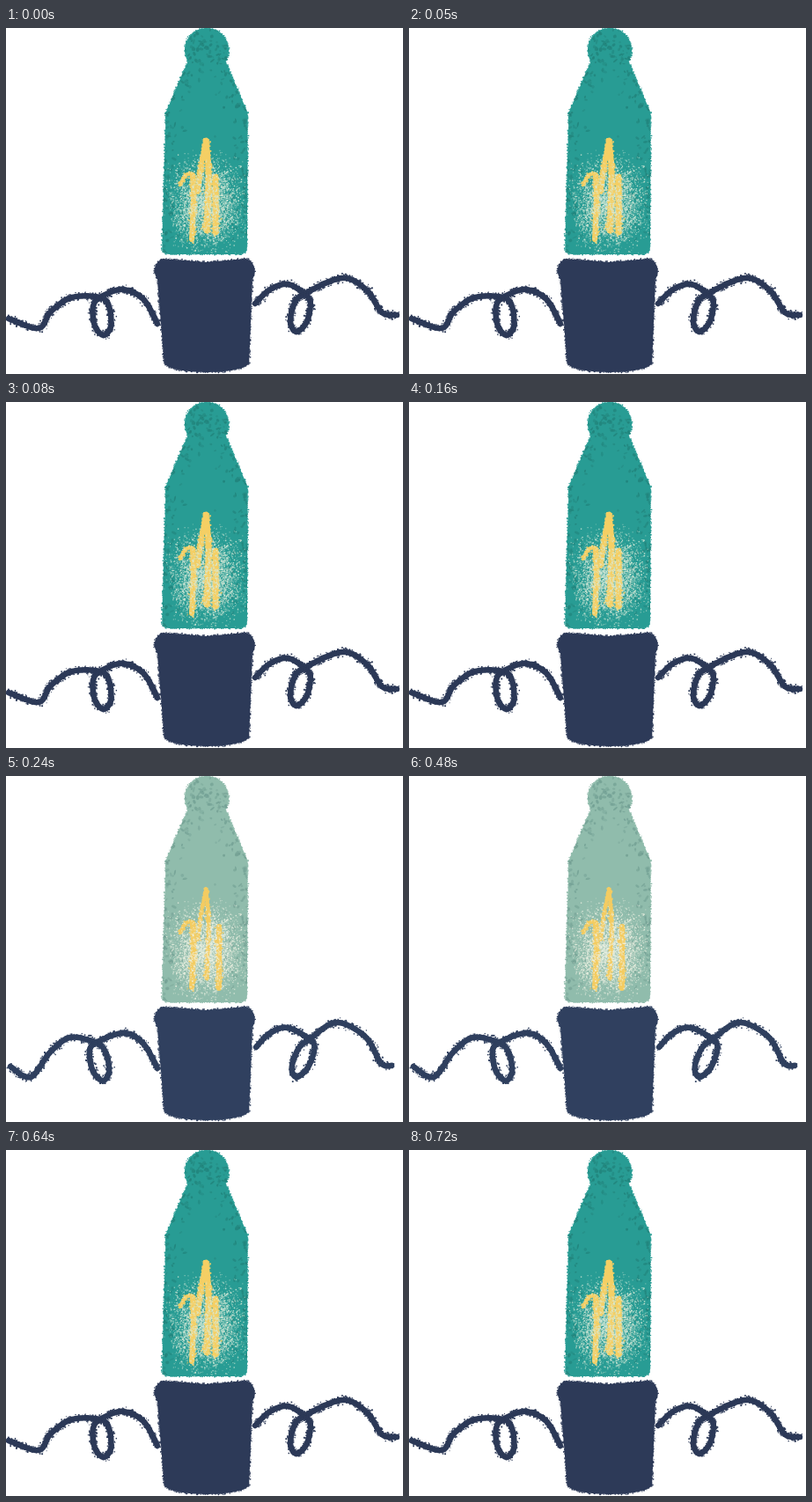
These frames come from a looping animation (451x393 px, 0.8 s). An HTML page with a canvas:

```html
<!DOCTYPE html>
<html lang="en">
<head>
<meta charset="utf-8">
<title>Blinking bulb</title>
<style>
html, body { margin: 0; width: 100%; height: 100%; overflow: hidden; background: #fff; }
canvas { display: block; }
</style>
</head>
<body>
<canvas id="stage" width="451" height="393"></canvas>
<script>
const W = 451, H = 393, LOOP = 800, ON = 240, OFF = 640;
const stage = document.getElementById('stage').getContext('2d');
const { PI, sin, sqrt, min, max, abs, hypot } = Math;

const DIM = {
  glass: '#289c94', grain: '#1e8078', navy: '#2d3a58', spray: '#d9ecd9', gold: '#f5cf63',
  peakWidth: 9, bar: { x: 238, top: 169, end: 232, width: 9 },
  wires: [
    { inner: [[172, 336], [156, 308], [132, 297]], knot: [107, 306], lean: 4, side: -1,
      outer: [[75, 306], [51, 322], [37, 341], [3, 330]] },
    { inner: [[283, 313], [300, 297], [320, 291]], knot: [339, 302], lean: -9, side: 1,
      outer: [[382, 284], [410, 298], [427, 323], [444, 326]] }
  ]
};
const LIT = {
  glass: '#90bcac', grain: '#6f9d91', navy: '#30405f', spray: '#eff3e4', gold: '#f4cc60',
  peakWidth: 5.5, bar: { x: 242, top: 171, end: 241, width: 8 },
  wires: [
    { inner: [[172, 332], [156, 304], [134, 292]], knot: [102, 303], lean: 8, side: -1,
      outer: [[73, 297], [50, 314], [28, 342], [5, 330]] },
    { inner: [[284, 308], [300, 292], [320, 286]], knot: [345, 299], lean: -15, side: 1,
      outer: [[375, 280], [408, 296], [426, 326], [438, 329]] }
  ]
};

let seed = 1;
function rnd() {
  seed = (seed + 0x6D2B79F5) | 0;
  let v = Math.imul(seed ^ (seed >>> 15), 1 | seed);
  v = (v + Math.imul(v ^ (v >>> 7), 61 | v)) ^ v;
  return ((v ^ (v >>> 14)) >>> 0) / 4294967296;
}
const bell = () => rnd() + rnd() + rnd() - 1.5;
const arc = (d, r) => sqrt(max(0, r * r - d * d));

// Half widths of the two bodies at a given height
function glassHalf(y) {
  const knob = y < 38 ? arc(y - 25, 25) : 0;
  const shoulder = y < 34 ? 0 : min(46.5, 21.5 + (y - 38) * 0.43) + max(0, y - 100) * 0.012;
  const corner = y > 249 ? 8 - arc(y - 249, 8) : 0;
  return max(knob, shoulder) - corner;
}
function socketHalf(y) {
  const rim = y < 291 ? 42 + arc(y - 276, 15) : 0;
  const side = y < 276 ? 0 : 54.5 - (y - 276) * 0.06;
  const base = y > 380 ? sqrt(max(0, 1 - ((y - 380) / 11) ** 2)) : 1;
  return max(rim, side) * base;
}
const glassMid = y => 228 - max(0, y - 100) * 0.016;
const socketMid = y => 225.5 + (y - 262) * 0.02;

function outline(top, end, half, mid) {
  const right = [], left = [];
  for (let y = top; y <= end; y += 0.5) {
    right.push([mid(y) + half(y), y]);
    left.unshift([mid(y) - half(y), y]);
  }
  return right.concat(left);
}

// Catmull-Rom samples through the points
function curve(pts, steps = 16) {
  const out = [], at = i => pts[max(0, min(pts.length - 1, i))];
  for (let i = 0; i < pts.length - 1; i++) {
    const [a, b, c, d] = [at(i - 1), at(i), at(i + 1), at(i + 2)];
    for (let k = 0; k < steps; k++) {
      const t = k / steps;
      out.push([0, 1].map(j => b[j] + 0.5 * t * (c[j] - a[j] +
        t * (2 * a[j] - 5 * b[j] + 4 * c[j] - d[j] +
        t * (3 * b[j] - a[j] - 3 * c[j] + d[j])))));
    }
  }
  return out.concat([at(pts.length)]);
}

// A wire runs from the socket, curls once below its knot and goes on
function wirePath({ inner, knot, lean, side, outer }) {
  const curl = [];
  for (let i = 0; i <= 6; i++) {
    const u = i / 6, drop = sin(PI * u) ** 2;
    curl.push([knot[0] + lean * drop + side * 10.5 * sin(2 * PI * u), knot[1] + 43 * drop]);
  }
  return curve([...inner, ...curl, ...outer]);
}

function trace(g, pts) {
  g.beginPath();
  pts.forEach(p => g.lineTo(p[0], p[1]));
}

// Loose specks around a line
function crumbs(g, pts, spread, perPixel, size) {
  for (let i = 1; i < pts.length; i++) {
    const [x, y] = pts[i], [px, py] = pts[i - 1];
    const count = Math.floor(hypot(x - px, y - py) * perPixel + rnd());
    for (let k = 0; k < count; k++) {
      const t = rnd(), s = size * (0.6 + rnd() * 0.8);
      g.fillRect(px + (x - px) * t + bell() * spread - s / 2,
                 py + (y - py) * t + bell() * spread - s / 2, s, s);
    }
  }
}

function solid(g, pts, color) {
  g.fillStyle = color;
  trace(g, pts);
  g.fill();
  crumbs(g, pts, 1, 0.8, 1.2);
}

function chalk(g, pts, width, color) {
  g.fillStyle = g.strokeStyle = color;
  g.lineWidth = width * 0.75;
  g.lineCap = g.lineJoin = 'round';
  trace(g, pts);
  g.stroke();
  crumbs(g, pts, width * 0.5, 5, 1.4);
}

// Dark blotches, thickest on the knob and along the sides
function darkGrain(g, color) {
  g.fillStyle = color;
  for (let i = 0; i < 2600; i++) {
    const x = 177 + rnd() * 98, y = rnd() * 257;
    const gap = glassHalf(y) - abs(x - glassMid(y));
    const keep = y < 38 ? 0.34 : Math.exp(-gap / 9) * (y < 130 ? 0.6 : 0.4);
    if (gap < 0 || rnd() > keep) continue;
    g.globalAlpha = 0.3 + rnd() * 0.5;
    g.beginPath();
    g.ellipse(x, y, 0.8 + rnd() * 2.4, 0.7 + rnd() * 1.3, rnd() * PI, 0, 2 * PI);
    g.fill();
  }
  g.globalAlpha = 1;
}

function spray(g, color, count, size = 1) {
  g.fillStyle = color;
  for (let i = 0; i < count; i++) {
    const s = size * (0.7 + rnd() * 0.7);
    g.globalAlpha = 0.25 + rnd() * 0.6;
    g.fillRect(227 + bell() * 36, 199 + bell() * 44, s, s);
  }
  g.globalAlpha = 1;
}

function filament(g, { gold, peakWidth, bar }) {
  chalk(g, curve([[198, 178], [204, 167], [212, 166]]), 5, gold);
  chalk(g, curve([[212, 167], [213, 195], [211, 240]]), 8, gold);
  chalk(g, curve([[218, 186], [222, 155], [227, 128]]), peakWidth * 0.8, gold);
  chalk(g, curve([[227, 128], [230, 165], [228, 230]]), peakWidth, gold);
  chalk(g, curve([[bar.x, bar.top], [bar.x, bar.end]]), bar.width, gold);
}

function render(look) {
  const sheet = document.createElement('canvas');
  sheet.width = W;
  sheet.height = H;
  const g = sheet.getContext('2d');
  seed = 41;
  solid(g, outline(0, 257, glassHalf, glassMid), look.glass);
  g.globalCompositeOperation = 'source-atop';
  darkGrain(g, look.grain);
  spray(g, look.spray, 3400);
  filament(g, look);
  spray(g, look.spray, 1300, 1.2);
  g.globalCompositeOperation = 'source-over';
  seed = 97;
  const rim = [[227, 266]];
  solid(g, [...rim, ...outline(262, 391, socketHalf, socketMid), ...rim], look.navy);
  look.wires.forEach(wire => chalk(g, wirePath(wire), 8.6, look.navy));
  return sheet;
}

const dim = render(DIM), lit = render(LIT);

function draw(now) {
  const t = now % LOOP;
  stage.fillStyle = '#fff';
  stage.fillRect(0, 0, W, H);
  stage.drawImage(t >= ON && t < OFF ? lit : dim, 0, 0);
}

function tick() {
  draw(performance.now());
  requestAnimationFrame(tick);
}
tick();
</script>
</body>
</html>
```
